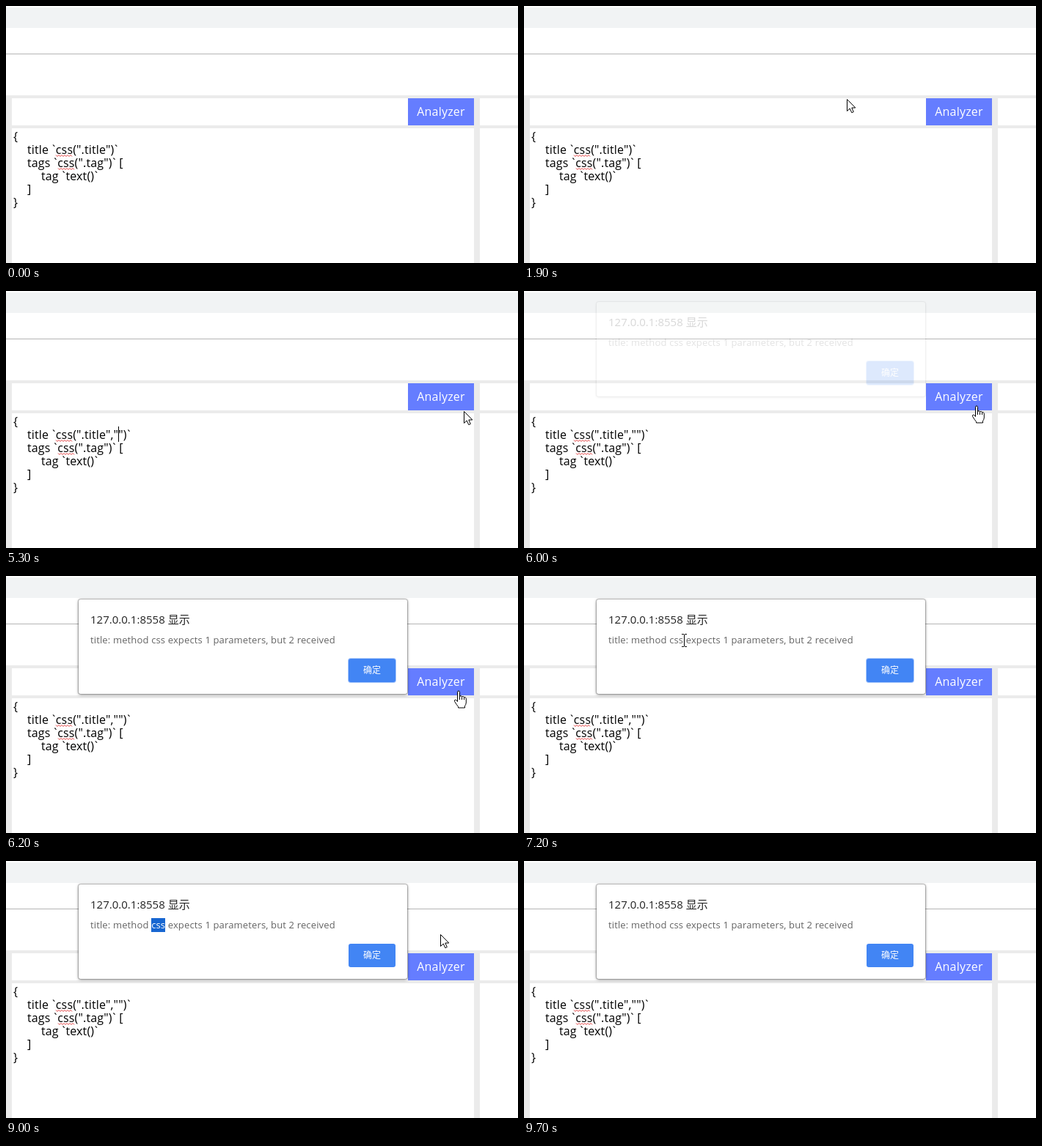
An HTML page for the animation above (9800 ms loop, 698x351 px).

```html
<!DOCTYPE html>
<html lang="en">
<head>
<meta charset="utf-8">
<title>Analyzer</title>
<style>
  html, body { margin: 0; width: 100%; height: 100%; overflow: hidden; background: #fff; }
  body { position: relative; font: 16px/18px "Open Sans", "Noto Sans CJK SC", "Noto Sans CJK", sans-serif; color: #000; }
  div, svg { position: absolute; }
  .bar { background: #ebebeb; }
  #run {
    left: 548px; top: 126px; width: 90px; height: 37px;
    background: #657dff; color: #fff; text-align: center; line-height: 37px; letter-spacing: .2px;
  }
  #code { left: 10px; top: 169px; letter-spacing: .15px; white-space: pre; }
  #code div { position: static; height: 18px; }
  .in1 { padding-left: 19px; }
  .in2 { padding-left: 38px; }
  b { font-weight: 400; margin: 0 -2px; }
  #caret { position: absolute; width: 1px; height: 21px; margin-top: -2px; background: #000; }
  #dialog {
    left: 99px; top: 32px; width: 448px; height: 129px; border-radius: 3px; background: #fff;
    box-shadow: 0 0 1px 1px rgba(0,0,0,.25), 0 1px 4px rgba(0,0,0,.4);
  }
  #host { left: 16px; top: 17px; font-size: 15px; line-height: 20px; color: #222; white-space: nowrap; }
  #msg { left: 16px; top: 46px; font-size: 13px; line-height: 19px; letter-spacing: .15px; color: #646464; white-space: pre; }
  #sel { display: inline-block; background: #1766d1; color: #fff; }
  #ok {
    left: 368px; top: 81px; width: 64px; height: 32px; border-radius: 3px;
    background: #4285f4; color: #fff; font-size: 12px; font-weight: 500; line-height: 32px; text-align: center;
  }
  #ok.focus { box-shadow: 0 0 0 1px #a9c8fb; }
  svg { left: 0; top: 0; }
</style>
</head>
<body>
<div class="bar" style="left:0;top:2px;width:698px;height:28px;background:#f1f3f4"></div>
<div style="left:0;top:65px;width:698px;height:1px;background:#b4b4b4"></div>
<div class="bar" style="left:0;top:122px;width:698px;height:4px"></div>
<div class="bar" style="left:0;top:163px;width:698px;height:4px"></div>
<div class="bar" style="left:0;top:122px;width:8px;height:229px"></div>
<div class="bar" style="left:638px;top:122px;width:8px;height:229px"></div>
<div id="run">Analyzer</div>

<div id="code"><div>{</div><div class="in1">title <b>`</b>css(".title"<span id="before"></span><i id="caret"></i><span id="after"></span>)<b>`</b></div><div class="in1">tags <b>`</b>css(".tag")<b>`</b> [</div><div class="in2">tag <b>`</b>text()<b>`</b></div><div class="in1">]</div><div>}</div></div>

<svg width="698" height="351" fill="none" stroke="#e23a3a">
  <path id="wave1"/>
  <path id="wave2"/>
</svg>

<div id="dialog">
  <div id="host">127.0.0.1:8558 显示</div>
  <div id="msg">title: method <span id="sel"></span><span id="rest"></span> expects 1 parameters, but 2 received</div>
  <div id="ok">确定</div>
</div>

<svg width="698" height="351">
  <g id="pointer" fill="#fff" stroke="#000">
    <path id="arrow" d="M.5 .5V16.5L4.2 13L6.8 18.7L9.3 17.6L6.8 12H11.8Z"/>
    <path id="beam" fill="none" shape-rendering="crispEdges" d="M-3 -8.5H0M1 -8.5H4M.5 -8V8M-3 8.5H0M1 8.5H4"/>
    <path id="hand" stroke-linejoin="round" d="M-1.5 14V1.5Q-1.5 0 0 0T1.5 1.5V8Q1.5 6.5 3 6.7T4.5 8.4Q5 7.2 6.3 7.5T7.5 9.3Q8 8.3 9.2 8.8T10.3 11V16Q10 19 8.5 20.5V23H-.5V21.5Q-3 18.5-5.3 14.5Q-6 12.5-4.7 12T-1.5 14.5ZM1.5 8V12M4.5 8.4V12M7.5 9.3V12"/>
  </g>
</svg>

<script>
const LOOP = 9800, STEP = 100;
const $ = id => document.getElementById(id);

// time, x, y, pointer shape from that time on
const path = [
  [0, 505, 113, ''], [1800, 505, 113, 'arrow'], [1900, 440, 127, 'arrow'], [2100, 270, 170, 'beam'],
  [2300, 165, 192, 'beam'], [2500, 145, 196, 'beam'], [3700, 145, 196, ''],
  [4900, 145, 196, 'beam'], [5000, 230, 192, 'beam'], [5200, 560, 171, 'beam'], [5300, 624, 164, 'arrow'],
  [5500, 621, 160, 'hand'], [5700, 617, 157, 'hand'], [6300, 617, 157, 'hand'],
  [6500, 560, 137, 'hand'], [6600, 500, 125, 'arrow'], [6700, 431, 116, 'arrow'], [6900, 300, 98, 'arrow'],
  [7000, 250, 91, 'beam'], [7300, 202, 87, 'beam'], [7400, 201, 87, 'beam'], [7500, 201, 87, 'beam'],
  [7900, 218, 87, 'beam'], [8200, 218, 87, 'beam'], [8300, 245, 99, 'arrow'], [8400, 363, 130, 'arrow'],
  [8500, 418, 132, 'arrow'], [8600, 449, 135, 'arrow'], [9000, 592, 100, 'arrow'], [9100, 612, 86, 'hand'],
  [9200, 620, 82, 'hand'], [9300, 650, 66, 'arrow'], [9400, 687, 45, 'arrow'], [9500, 698, 45, '']
];
const caretOn = [[2700, 3200], [3700, 4700], [5200, 5700]];

const within = (t, from, to) => t >= from && t < to;
const zigzag = (x, y, w) => {
  let d = `M${x} ${y}`;
  for (let i = 1; i * 2 <= w; i++) d += `L${x + i * 2} ${y + (i % 2 ? 2 : 0)}`;
  return d;
};

function pose(t) {
  let i = path.length - 1;
  while (path[i][0] > t) i--;
  const a = path[i], b = path[i + 1] || a;
  const k = a === b ? 0 : (t - a[0]) / (b[0] - a[0]);
  return { x: Math.round(a[1] + (b[1] - a[1]) * k), y: Math.round(a[2] + (b[2] - a[2]) * k), shape: a[3] };
}

function drawPointer(t) {
  const p = pose(t);
  $('pointer').setAttribute('transform', `translate(${p.x} ${p.y})`);
  for (const s of ['arrow', 'beam', 'hand']) $(s).style.display = s === p.shape ? '' : 'none';
}

function drawCode(t) {
  $('before').textContent = t < 3700 ? '' : t < 4100 ? ',' : ',"';
  $('after').textContent = t < 4200 ? '' : '"';
  $('caret').style.visibility = caretOn.some(([from, to]) => within(t, from, to)) ? 'visible' : 'hidden';
}

function drawDialog(t) {
  const p = Math.max(0, Math.min(1, (t - 5900) / 300));
  const style = $('dialog').style;
  style.opacity = p ** 1.6;
  style.transform = p < 1 ? `translateY(${Math.round(-25 * (1 - p))}px)` : 'none';
  const n = within(t, 7600, 9700) ? Math.min(3, (t - 7500) / STEP) : 0;
  $('sel').textContent = 'css'.slice(0, n);
  $('rest').textContent = 'css'.slice(n);
  $('ok').className = t < 7600 ? 'focus' : '';
}

function draw() {
  const t = Math.floor(performance.now() % LOOP / STEP) * STEP;
  drawCode(t);
  drawDialog(t);
  drawPointer(t);
  requestAnimationFrame(draw);
}

$('wave1').setAttribute('d', zigzag(68, 203.5, 23));
$('wave2').setAttribute('d', zigzag(71, 221.5, 23));
draw();
</script>
</body>
</html>
```
